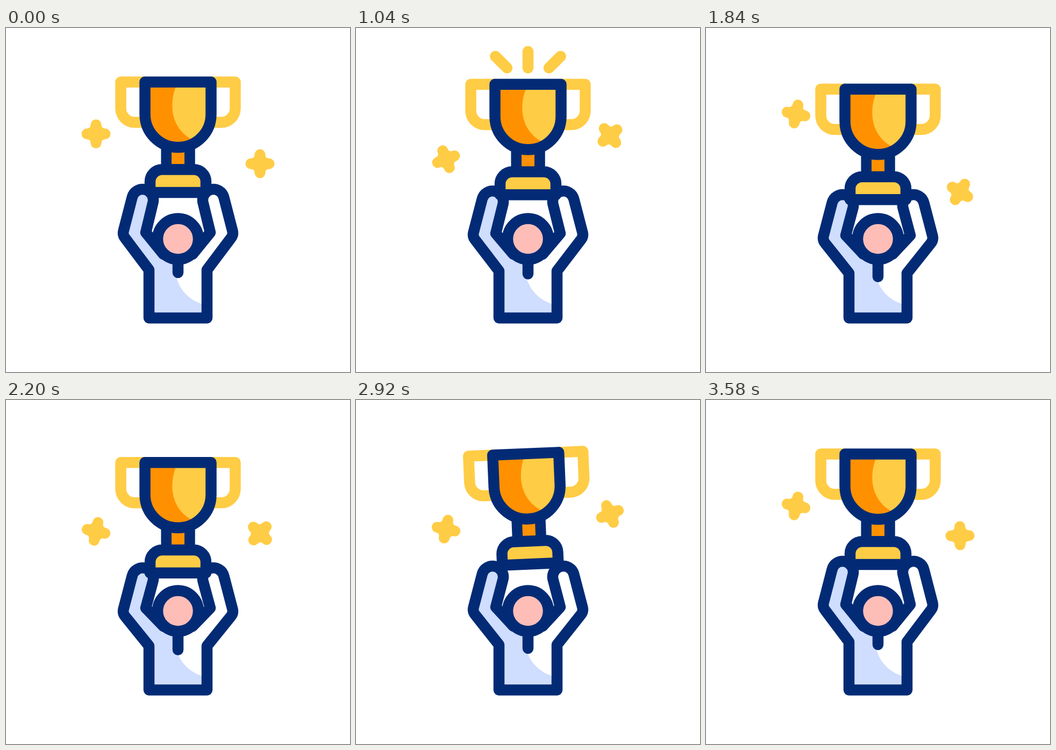
Write an HTML page that moves like this. It is 640x640 px and loops after 3.6 s.

```html
<!DOCTYPE html>
<html lang="en">
<head>
<meta charset="utf-8">
<title>Champion</title>
<style>
  html, body { margin: 0; width: 100%; height: 100%; overflow: hidden; background: #fff; }
  svg { display: block; width: 100vw; height: 100vh; }
  .line, .gold { fill: none; stroke-width: 20.5; stroke-linecap: round; stroke-linejoin: round; }
  .line { stroke: #032b75; }
  .gold { stroke: #ffcc45; }
  .star { fill: #ffcc45; }
</style>
</head>
<body>
<svg viewBox="0 0 640 640">
  <defs>
    <clipPath id="bodyClip"><path id="body"/></clipPath>
    <path id="spark" d="M-10-17A10 10 0 0 1 10-17Q10-10 17-10A10 10 0 0 1 17 10Q10 10 10 17A10 10 0 0 1-10 17Q-10 10-17 10A10 10 0 0 1-17-10Q-10-10-10-17Z"/>
  </defs>

  <path id="rays" class="gold"/>
  <use id="starL" class="star" href="#spark"/>
  <use id="starR" class="star" href="#spark"/>

  <path clip-path="url(#bodyClip)" fill="#cfddff" d="M200 280H314V445C316 482 338 508 374 516V550H200Z"/>
  <path id="outline" class="line"/>
  <circle class="line" cx="320" cy="392.5" r="38" style="fill:#ffbdb8"/>
  <path id="neck" class="line"/>

  <g id="trophy">
    <path class="gold" d="M258.5 100.5H213.5V149.5A26 26 0 0 0 239.5 175.5H260M381.5 100.5H426.5V149.5A26 26 0 0 1 400.5 175.5H380"/>
    <path class="line" style="fill:#ff9100" d="M298.7 215V270M341.5 215V270"/>
    <path fill="#ff9100" d="M308 215H332V270H308Z"/>
    <path class="line" style="fill:#ffcc45" d="M268 306V286A22.5 22.5 0 0 1 290.5 263.3H349.5A22.5 22.5 0 0 1 372 286V306Z"/>
    <path fill="#ff9100" d="M258.5 100.5H381.5V160.5A61.5 61.5 0 0 1 258.5 160.5Z"/>
    <path fill="#ffcc45" d="M320 100.5C302 135 304 186 347 208L375 190L381.5 160V100.5Z"/>
    <path class="line" d="M258.5 100.5H381.5V160.5A61.5 61.5 0 0 1 258.5 160.5Z"/>
  </g>
</svg>
<script>
const LOOP = 3600;
const THROW = 2200, APEX = 2453, CATCH = 3000;

const $ = id => document.getElementById(id);
const clamp = x => Math.max(0, Math.min(1, x));
const smooth = x => (1 - Math.cos(Math.PI * clamp(x))) / 2;
const mix = (a, b, k) => a + (b - a) * k;

// Rises to 1, holds, and returns to 0
const pulse = (t, rise, hold, fall) => smooth(t / rise) - smooth((t - rise - hold) / fall);

// Two quick pumps, a slow wind-up before the throw, and the catch
const crouch = t =>
  pulse(t, 280, 0, 280) + pulse(t - 560, 290, 0, 290) +
  pulse(t - 1200, 900, 100, 90) + pulse(t - 2810, 170, 0, 440);

// Vertical drift, mirrored in time about mid: inner there, outer half a swing away
function swing(t, { mid, half, inner, outer }) {
  const u = Math.abs(t - mid);
  const edge = t < mid ? mid : LOOP - mid;
  return u < half ? mix(inner, outer, smooth(u / half))
                  : mix(outer, 0, smooth((u - half) / (edge - half)));
}

const STARS = [
  { id: 'starL', x: 167.5, y: 197, mid: 1620, half: 800, inner: -60, outer: 70,
    turn: t => 102 * smooth(t / 1700) },
  { id: 'starR', x: 472.5, y: 252.5, mid: 1780, half: 800, inner: 54, outer: -54,
    turn: t => 120 * t / LOOP + 60 * smooth((t - 800) / 700) }
];

function drawStar(star, t) {
  const y = star.y + swing(t, star);
  $(star.id).setAttribute('transform', `translate(${star.x} ${y}) rotate(${star.turn(t)})`);
}

// One side from hip over the hand to the neck: -1 left, 1 right
function arm(p, side) {
  const at = (x, y) => `${320 + side * (320 - x)} ${y}`;
  const hand = 12.3 * p, elbow = 11.5 * p, shoulder = 7.5 * p, inner = 6.5 * p;
  return `M${at(266, 539.5)}L${at(266, 450 + shoulder)}L${at(222, 391.5 + elbow)}` +
    `Q${at(216.5, 385 + elbow)} ${at(218.7, 377 + elbow)}L${at(234.7, 315 + hand)}` +
    `A19.8 19.8 0 0 ${side < 0 ? 1 : 0} ${at(273.4, 325 + hand)}` +
    `L${at(260, 380.5 + inner)}L${at(293, 421)}`;
}

function drawPerson(p) {
  const left = arm(p, -1);
  $('outline').setAttribute('d', left + arm(p, 1) + 'M266 539.5H374');
  $('body').setAttribute('d', left + 'H347L374 450V539.5Z');
  $('neck').setAttribute('d', `M320 432V${455 + 9.7 * p}`);
}

function drawTrophy(t, p) {
  let y = 16.5 * p, tilt = 0;
  if (t > THROW && t < CATCH) {
    const d = t - APEX;
    const drop = d < 0 ? 91.5 * (d / (APEX - THROW)) ** 2 : 75 * (d / 470) ** 2;
    y = Math.min(y, drop - 75);
    tilt = -7.5 * Math.sin(Math.PI * clamp((t - 2240) / 760));
  }
  $('trophy').setAttribute('transform', `translate(0 ${y}) rotate(${tilt} 320 203)`);
}

// Each ray grows outwards, then leaves from its root
function drawRays(t) {
  const u = t < 980 ? t - 420 : t - 980;
  const tip = clamp(u / 110), root = clamp((u - 150) / 140);
  const ray = (x, dx, dy) => {
    const at = k => `${x + dx * k} ${74.3 + dy * k}`;
    return `M${at(root)}L${at(tip)}`;
  };
  const shown = tip > 0 && root < 1;
  $('rays').setAttribute('d', shown ? ray(281, -39, -39) + ray(320, 0, -55) + ray(359, 39, -39) : '');
}

function draw(t) {
  const p = crouch(t);
  drawRays(t);
  STARS.forEach(star => drawStar(star, t));
  drawPerson(p);
  drawTrophy(t, p);
}

const start = performance.now();
function tick() {
  draw((performance.now() - start) % LOOP);
  requestAnimationFrame(tick);
}
draw(0);
requestAnimationFrame(tick);
</script>
</body>
</html>
```
